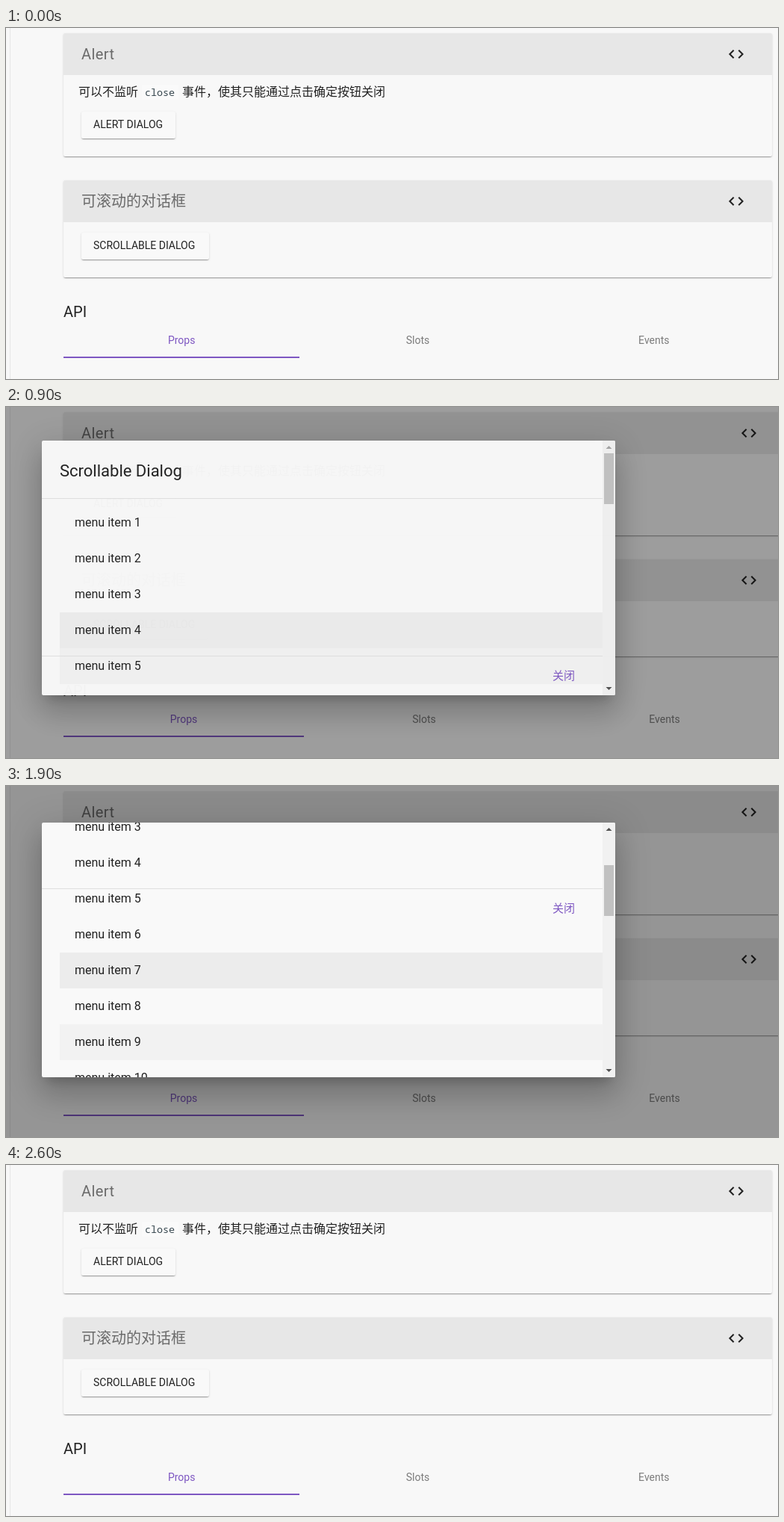
An HTML page with a canvas for the animation above (3100 ms loop, 1034 by 470 pixels).

```html
<!DOCTYPE html>
<html lang="zh-CN">
<head>
<meta charset="utf-8">
<title>Scrollable dialog</title>
<style>
html, body { margin: 0; width: 100%; height: 100%; overflow: hidden; background: #f8f8f8; }
canvas { display: block; }
</style>
</head>
<body>
<canvas id="stage" width="1034" height="470"></canvas>
<script>
const W = 1034, H = 470, LOOP = 3100, STEP = 100;
const LATIN = 'Roboto, sans-serif';
const CJK = '"Noto Sans CJK SC", "Noto Sans CJK", sans-serif';
const MONO = '"Noto Sans Mono", "DejaVu Sans Mono", monospace';
const ACCENT = '#7e57c2', INK = '#212121', MUTED = 'rgba(0,0,0,.54)';

// Shadow layers: dy, blur, spread, alpha
const LOW = [[2, 1, -1, .2], [1, 1, 0, .14], [1, 3, 0, .12]];
const RAISED = [[2, 4, -1, .2], [4, 5, 0, .14], [1, 10, 0, .12]];
const DEEP = [[11, 15, -7, .2], [24, 38, 3, .14], [9, 46, 8, .12]];

const DLG = { x: 48, y: 49, w: 768, h: 341, content: 1534, bar: 17 };
const OPEN = 742, CLOSE = 2370, END = 2600, ANIM = 450;
const SCROLL = [[1000, 0], [1100, 70], [1200, 230], [1300, 386], [1400, 400],
  [1500, 380], [1600, 295], [1700, 225], [1800, 200]];
// Hovered menu items: item, enter, leave
const HOVERS = [[5, 830, 890], [4, 804, 1080], [9, 1150, 1215], [12, 1270, 1320],
  [13, 1350, 1430], [11, 1440, 1650], [9, 1690, 1800], [7, 1800, 1900], [6, 1900, 1950]];

const stage = document.getElementById('stage').getContext('2d');
const layer = document.createElement('canvas');
layer.width = W;
layer.height = H;
const sheet = layer.getContext('2d');

const clamp = v => Math.max(0, Math.min(1, v));

// cubic-bezier(.23, 1, .32, 1)
function easeOut(x) {
  x = clamp(x);
  let lo = 0, hi = 1;
  for (let i = 0; i < 24; i++) {
    const s = (lo + hi) / 2, r = 1 - s;
    if (3 * r * r * s * .23 + 3 * r * s * s * .32 + s * s * s < x) lo = s; else hi = s;
  }
  return 1 - (1 - lo) ** 3;
}

function track(keys, t) {
  if (t <= keys[0][0]) return keys[0][1];
  for (let i = 1; i < keys.length; i++) {
    const [t0, a] = keys[i - 1], [t1, b] = keys[i];
    if (t <= t1) return a + (b - a) * (t - t0) / (t1 - t0);
  }
  return keys[keys.length - 1][1];
}

function hoverLevel([, enter, leave], t) {
  const rise = clamp((Math.min(t, leave) - enter) / 160);
  return clamp(rise - Math.max(0, t - leave) / 300);
}

function text(c, str, x, y, size, color, family = LATIN, weight = 400, align = 'left') {
  c.font = `${weight} ${size}px ${family}`;
  c.textAlign = align;
  c.fillStyle = color;
  c.fillText(str, x, y);
}

function rect(c, x, y, w, h, color) {
  c.fillStyle = color;
  c.fillRect(x, y, w, h);
}

function roundPath(c, x, y, w, h, r = 2) {
  c.beginPath();
  c.roundRect(x, y, w, h, r);
}

function panel(c, x, y, w, h, color, shadows) {
  const far = 3000;
  for (const [dy, blur, spread, alpha] of shadows) {
    c.save();
    c.shadowColor = `rgba(0,0,0,${alpha})`;
    c.shadowBlur = blur;
    c.shadowOffsetX = far;
    c.shadowOffsetY = dy;
    c.fillStyle = '#000';
    roundPath(c, x - far - spread, y - spread, w + 2 * spread, h + 2 * spread);
    c.fill();
    c.restore();
  }
  c.fillStyle = color;
  roundPath(c, x, y, w, h);
  c.fill();
}

// Hover tint and ripple, clipped to a button
function feedback(c, x, y, w, h, hover, ripple) {
  c.save();
  roundPath(c, x, y, w, h);
  c.clip();
  rect(c, x, y, w, h, `rgba(0,0,0,${.08 * hover})`);
  if (ripple && ripple.r > 0) {
    c.fillStyle = `rgba(0,0,0,${ripple.alpha})`;
    c.beginPath();
    c.arc(ripple.x, ripple.y, ripple.r, 0, Math.PI * 2);
    c.fill();
  }
  c.restore();
}

function codeIcon(c, cx, cy) {
  c.strokeStyle = INK;
  c.lineWidth = 2;
  for (const d of [-1, 1]) {
    c.beginPath();
    c.moveTo(cx + d * 3.3, cy - 5.3);
    c.lineTo(cx + d * 8.6, cy);
    c.lineTo(cx + d * 3.3, cy + 5.3);
    c.stroke();
  }
}

function card(c, y, h, right) {
  panel(c, 77, y, right - 77, h, '#f8f8f8', LOW);
  c.fillStyle = '#e7e7e7';
  roundPath(c, 77, y, right - 77, 56, [2, 2, 0, 0]);
  c.fill();
  codeIcon(c, right - 48, y + 28);
}

function drawPage(c, t) {
  const right = t >= 800 && t < END ? 1043 : 1026;
  rect(c, 0, 0, W, H, '#f8f8f8');
  rect(c, 5, 0, 1, H, '#e6e6e6');

  card(c, 7, 165, right);
  c.letterSpacing = '0.4px';
  text(c, 'Alert', 101, 42, 20, MUTED);
  c.letterSpacing = '0px';
  text(c, '可以不监听', 97, 91, 16, INK, CJK, 300);
  rect(c, 182, 76, 49, 20, '#fafafa');
  text(c, 'close', 186, 91, 13.33, '#37474f', MONO);
  text(c, '事件，使其只能通过点击确定按钮关闭', 236, 91, 16, INK, CJK, 300);
  panel(c, 101, 112, 126, 36, '#f9f9f9', LOW);
  text(c, 'ALERT DIALOG', 117, 134, 14, INK);

  card(c, 204, 130, right);
  text(c, '可滚动的对话框', 101, 239, 20, MUTED, CJK, 300);
  const pressed = t >= 500 && t < 1000;
  panel(c, 101, 274, 171, 36, '#f9f9f9', pressed ? RAISED : LOW);
  if (t >= 300 && t < 1000) {
    const r = track([[450, 0], [500, 42], [600, 100], [700, 136], [800, 170]], t);
    feedback(c, 101, 274, 171, 36, 1, { x: 240, y: 290, r, alpha: .1 });
  }
  text(c, 'SCROLLABLE DIALOG', 117, 296, 14, INK);

  text(c, 'API', 77, 387, 20, INK);
  const tab = (right - 77) / 3;
  ['Props', 'Slots', 'Events'].forEach((name, i) =>
    text(c, name, 77 + tab * (i + .5), 423, 14, i ? 'rgba(0,0,0,.5)' : ACCENT, LATIN, 400, 'center'));
  rect(c, 77, 440, Math.round(tab), 2, ACCENT);
}

function arrow(c, x, y, dir, color) {
  c.fillStyle = color;
  c.beginPath();
  c.moveTo(x - 4, y - dir * 2);
  c.lineTo(x + 4, y - dir * 2);
  c.lineTo(x, y + dir * 2);
  c.fill();
}

function drawScrollbar(c, scroll) {
  const { x, y, w, h, bar, content } = DLG;
  const left = x + w - bar, room = h - 2 * bar;
  rect(c, left, y, bar, h, '#f1f1f1');
  rect(c, left + 2, Math.round(y + bar + scroll * room / content), 13,
    Math.round(h * room / content), '#c1c1c1');
  arrow(c, left + 8.5, y + 9, -1, scroll > 0 ? '#505050' : '#a3a3a3');
  arrow(c, left + 8.5, y + h - 9, 1, '#505050');
}

function drawDialog(c, t) {
  const { x, y, w, h, bar } = DLG;
  const scroll = track(SCROLL, t), top = y - scroll, inner = w - bar;
  c.clearRect(0, 0, W, H);
  panel(c, x, y, w, h, '#f9f9f9', DEEP);
  c.save();
  roundPath(c, x, y, w, h);
  c.clip();

  text(c, 'Scrollable Dialog', 72, top + 48, 22, INK);
  rect(c, x, top + 77, inner, 1, '#e0e0e0');
  for (const hover of HOVERS) {
    const level = hoverLevel(hover, t);
    if (level) rect(c, 72, top + 86 + 48 * (hover[0] - 1), 727, 48, `rgba(0,0,0,${.08 * level})`);
  }
  for (let i = 0; i < 30; i++) {
    text(c, 'menu item ' + (i + 1), 92, top + 115 + 48 * i, 16, INK);
  }

  rect(c, x, top + 288, inner, 1, '#e0e0e0');
  const r = track([[2250, 0], [2300, 42], [2400, 70]], t);
  feedback(c, 703, top + 297, 88, 36, clamp((t - 1940) / 160), { x: 751, y: top + 298.5, r, alpha: .1 });
  text(c, '关闭', 747, top + 320, 15, ACCENT, CJK, 300, 'center');

  drawScrollbar(c, scroll);
  c.restore();
}

function draw(t) {
  drawPage(stage, t);
  if (t < 800 || t >= END) return;
  const p = t < CLOSE ? easeOut((t - OPEN) / ANIM) : 1 - easeOut((t - CLOSE) / ANIM);
  rect(stage, 0, 0, W, H, `rgba(0,0,0,${.4 * Math.min(1, p * 1.03)})`);
  drawDialog(sheet, t);
  stage.globalAlpha = Math.min(1, p * 1.09);
  stage.drawImage(layer, 0, Math.round(-34 * (1 - p)));
  stage.globalAlpha = 1;
}

const start = performance.now();
function tick() {
  const t = (performance.now() - start) % LOOP;
  draw(Math.floor(t / STEP) * STEP);
  requestAnimationFrame(tick);
}
tick();
</script>
</body>
</html>
```
